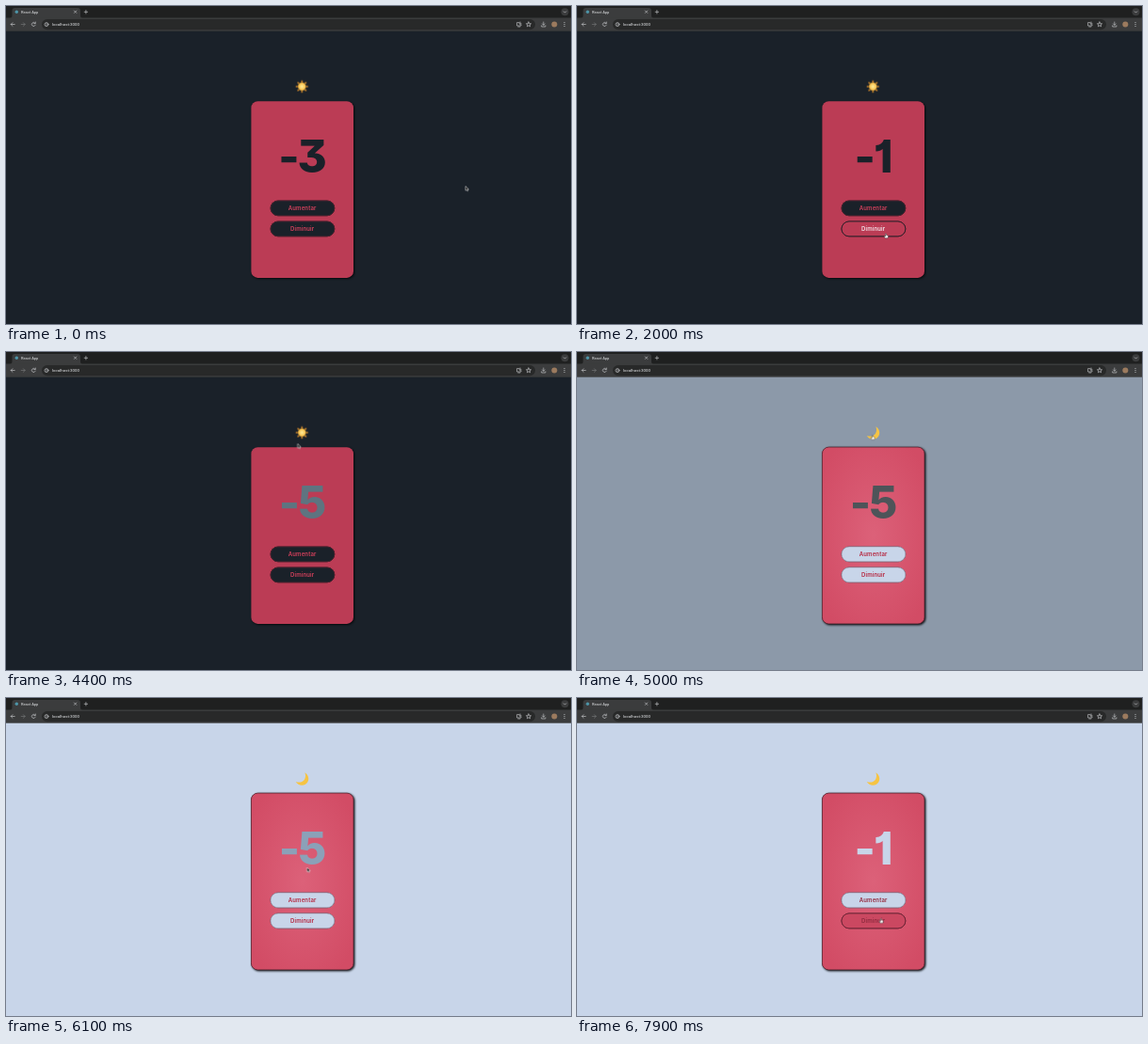
These frames come from a looping animation (600x338 px, 8 s). An HTML page:

```html
<!DOCTYPE html>
<html lang="pt">
<head>
<meta charset="utf-8">
<title>Contador</title>
<style>
  html, body { margin: 0; width: 600px; height: 338px; overflow: hidden; background: #1a2129; }
  svg { display: block; }
  .ui { font-family: Roboto, Arial, sans-serif; fill: #e8eaed; }
  .icon { fill: none; stroke: #c7c9cc; stroke-width: .65; stroke-linecap: round; stroke-linejoin: round; }

  /* every animation shares one 8 s clock: 1.25% = 100 ms */
  .page, .light, .sun, .moon, .count, .btn rect, .btn text, .cursor, .arrow, .hand {
    animation: 8s linear infinite;
  }
  .page { animation-name: page; }
  .light, .moon { animation-name: night-off; }
  .sun { animation-name: night-on; }
  .moon, .sun { animation-timing-function: step-end; }
  .card { filter: drop-shadow(1.7px 1.7px 1.3px #05080b); }

  .count {
    font: 800 47.5px Inter, "Open Sans", sans-serif;
    font-feature-settings: "cv01", "cv09", "calt" 0;
    letter-spacing: -2px;
    text-anchor: middle;
    animation-name: count;
  }
  .btn text { font: 600 6px Inter, "Open Sans", sans-serif; letter-spacing: .15px; text-anchor: middle; }
  .btn rect { stroke-width: .8; filter: drop-shadow(.7px .9px .4px #10080ccc); }
  .up rect { animation-name: up-box; }
  .up text { animation-name: up-ink; }
  .down rect { animation-name: down-box; }
  .down text { animation-name: down-ink; }

  .cursor { animation-name: path; }
  .hand { animation-name: hand; animation-timing-function: step-end; }
  .arrow { animation-name: arrow; animation-timing-function: step-end; }

  @keyframes page {
    0%, 61.25% { fill: #1a2129; }
    62.5% { fill: #8b98a8; }
    63.75% { fill: #bfcce0; }
    66.25%, 100% { fill: #c8d5e9; }
  }
  @keyframes night-off { 0%, 61.25% { opacity: 0; } 62.5%, 100% { opacity: 1; } }
  @keyframes night-on { 0%, 61.25% { opacity: 1; } 62.5%, 100% { opacity: 0; } }
  @keyframes count {
    0%, 37.4% { fill: #1a2129; }
    40%, 61.25% { fill: #5e7480; }
    62.5% { fill: #4c5358; }
    63.75% { fill: #8197a5; }
    66.25%, 87.4% { fill: #8ba1b8; }
    89%, 100% { fill: #c8d5e9; }
  }
  @keyframes up-box {
    0%, 9.5% { fill: #1a2129; stroke: #4a2733; }
    11.25%, 21% { fill: #bb3c55; stroke: #1a2129; }
    23.5%, 61.25% { fill: #1a2129; stroke: #4a2733; }
    62.5%, 77.5% { fill: #c8d5e9; stroke: #a9a3b8; }
    80%, 96% { fill: #cb4861; stroke: #6a2435; }
    98.5%, 100% { fill: #c8d5e9; stroke: #a9a3b8; }
  }
  @keyframes up-ink {
    0%, 9.5% { fill: #d5405c; }
    11.25%, 21% { fill: #f1e4e9; }
    23.5%, 61.25% { fill: #d5405c; }
    62.5%, 77.5% { fill: #b5263f; }
    80%, 96% { fill: #8d2b3f; }
    100% { fill: #98273c; }
  }
  @keyframes down-box {
    0%, 7.5% { fill: #1a2129; stroke: #4a2733; }
    8.75%, 9.5% { fill: #bb3c55; stroke: #1a2129; }
    11.25%, 21.5% { fill: #1a2129; stroke: #4a2733; }
    23.75%, 42% { fill: #bb3c55; stroke: #1a2129; }
    44.5%, 61.25% { fill: #1a2129; stroke: #4a2733; }
    62.5%, 96.25% { fill: #c8d5e9; stroke: #a9a3b8; }
    98.5%, 100% { fill: #cb4861; stroke: #6a2435; }
  }
  @keyframes down-ink {
    0%, 7.5% { fill: #d5405c; }
    8.75%, 9.5% { fill: #f1e4e9; }
    11.25%, 21.5% { fill: #d5405c; }
    23.75%, 42% { fill: #f1e4e9; }
    44.5%, 61.25% { fill: #d5405c; }
    62.5%, 96.25% { fill: #b5263f; }
    98.5%, 100% { fill: #8d2b3f; }
  }
  @keyframes path {
    0%, 2.5% { transform: translate(488px, 191.5px); }
    7.5% { transform: translate(362px, 236px); }
    9% { transform: translate(338px, 234px); }
    11.25%, 20% { transform: translate(322px, 215px); }
    23.75%, 40% { transform: translate(328px, 242px); }
    44% { transform: translate(278px, 234px); }
    46.25% { transform: translate(276px, 232px); }
    55%, 56% { transform: translate(309.7px, 97.5px); }
    58.75%, 70% { transform: translate(313.7px, 88.5px); }
    74% { transform: translate(318px, 150px); }
    78.75%, 95% { transform: translate(321.5px, 213.5px); }
    98.5%, 100% { transform: translate(322.7px, 234.5px); }
  }
  @keyframes hand {
    0% { opacity: 0; }
    8.5% { opacity: 1; }
    42.5% { opacity: 0; }
    57.5% { opacity: 1; }
    71% { opacity: 0; }
    78% { opacity: 1; }
    100% { opacity: 1; }
  }
  @keyframes arrow {
    0% { opacity: 1; }
    8.5% { opacity: 0; }
    42.5% { opacity: 1; }
    57.5% { opacity: 0; }
    71% { opacity: 1; }
    78% { opacity: 0; }
    100% { opacity: 0; }
  }
</style>
</head>
<body>
<svg width="600" height="338" viewBox="0 0 600 338">
  <defs>
    <radialGradient id="glow" cx=".5" cy=".5" r=".62">
      <stop offset="0" stop-color="#dc6179"/>
      <stop offset="1" stop-color="#d24c65"/>
    </radialGradient>
    <radialGradient id="disc">
      <stop offset="0" stop-color="#fff0a0"/>
      <stop offset="1" stop-color="#f6b73c"/>
    </radialGradient>
    <path id="ray" d="M-1.2-4.6L0-7L1.2-4.6Z"/>
  </defs>

  <rect class="page" width="600" height="338"/>

  <!-- browser window -->
  <rect width="600" height="13" fill="#1f2020"/>
  <path d="M4 13Q6.5 13 6.5 10V5Q6.5 2 9.5 2H76Q79 2 79 5V10Q79 13 81.5 13Z" fill="#3b3c3d"/>
  <rect y="12.5" width="600" height="14.2" fill="#3b3c3d"/>
  <rect x="38" y="14" width="524" height="11.2" rx="5.6" fill="#282929"/>
  <circle cx="11.3" cy="6.3" r="1.7" fill="#4d95a8"/>
  <text class="ui" x="16" y="7.7" font-size="4">React App</text>
  <text class="ui" x="49" y="21.2" font-size="4.4">localhost:3000</text>
  <circle cx="593.5" cy="6.3" r="4" fill="#3b3c3d"/>
  <g class="icon">
    <path d="M72.4 5l2.4 2.4m0-2.4l-2.4 2.4M83.2 6.3h3.4m-1.7-1.7v3.4M592.2 5.8l1.3 1.3 1.3-1.3"/>
    <path d="M9.2 19.5H5.2m1.8-1.8l-1.8 1.8 1.8 1.8"/>
    <path d="M16.2 19.5h4m-1.8-1.8l1.8 1.8-1.8 1.8" stroke="#77797b"/>
    <path d="M31 18.3a2 2 0 1 0 .2 2M31.3 17v1.6h-1.6"/>
    <circle cx="43" cy="19.6" r="2"/><path d="M43 19.5v1M43 18.5v.1"/>
    <path d="M545 17.6h-2.4v3.4h4.4v-1.2M543.8 22h2M546 17v2.4m-1-1l1 1 1-1"/>
    <path d="M555 17l.7 1.7 1.9.1-1.5 1.2.5 1.8-1.6-1-1.6 1 .5-1.8-1.5-1.2 1.9-.1Z"/>
    <path d="M570.8 17v3.2m-1.4-1.3l1.4 1.4 1.4-1.4M568.7 20.8v1.2h4.2v-1.2"/>
    <path d="M593 17.5v.1M593 19.5v.1M593 21.5v.1" stroke-width="1"/>
  </g>
  <circle cx="582.3" cy="19.5" r="3" fill="#9b7a5e"/>

  <!-- theme switch -->
  <g class="sun" transform="translate(314.3 85.6)">
    <g id="rays" fill="#f09a2c"></g>
    <circle r="4.2" fill="url(#disc)"/>
  </g>
  <path class="moon" d="M317.3 79.3C322.3 82 322.6 89 318 91.7C314.3 93.8 309.6 92.5 307.8 89C311.8 90.4 315.5 89.3 317.2 86.2C318.4 84 318.3 81.5 317.3 79.3Z" fill="#f6c443"/>

  <!-- counter card -->
  <g class="card">
    <rect x="260.4" y="101.3" width="108.6" height="187.6" rx="7" fill="#bb3c55"/>
    <rect class="light" x="260.4" y="101.1" width="108.6" height="187.8" rx="7" fill="url(#glow)" stroke="#48202b" stroke-width=".7"/>
  </g>
  <text class="count" id="count" x="314" y="177">-3</text>
  <g class="btn up">
    <rect x="281" y="207" width="67.8" height="15.8" rx="7.9"/>
    <text x="314.7" y="217">Aumentar</text>
  </g>
  <g class="btn down">
    <rect x="281" y="229" width="67.8" height="15.8" rx="7.9"/>
    <text x="314.7" y="239">Diminuir</text>
  </g>

  <g class="cursor">
    <path class="arrow" d="M0 0V4.6L1.1 3.6L1.9 5.2L2.7 4.8L2 3.3H3.4Z" fill="#111" stroke="#fff" stroke-width=".5"/>
    <path class="hand" d="M-.5 0Q0-.5.5 0V1.6L2 2Q2.6 2.2 2.5 3L2 4.7H-.7L-2 2.8Q-1.7 2-.5 3Z" fill="#fff" stroke="#222" stroke-width=".4"/>
  </g>
</svg>
<script>
  const LOOP = 8000;
  // click times and the value shown from then on
  const clicks = [
    [0, -3], [1000, -2], [1200, -1], [1500, 0],
    [2000, -1], [2300, -2], [2500, -3], [2700, -4], [3000, -5],
    [7000, -4], [7200, -3], [7400, -2], [7600, -1]
  ];
  const count = document.getElementById('count');
  const rays = document.getElementById('rays');
  for (let a = 0; a < 360; a += 45) {
    rays.innerHTML += `<use href="#ray" transform="rotate(${a})"/>`;
  }

  let start;
  function draw(now) {
    start ??= now;
    const t = (now - start) % LOOP;
    const value = clicks.findLast(([at]) => at <= t)[1];
    if (count.textContent !== String(value)) count.textContent = value;
    requestAnimationFrame(draw);
  }
  requestAnimationFrame(draw);
</script>
</body>
</html>
```
